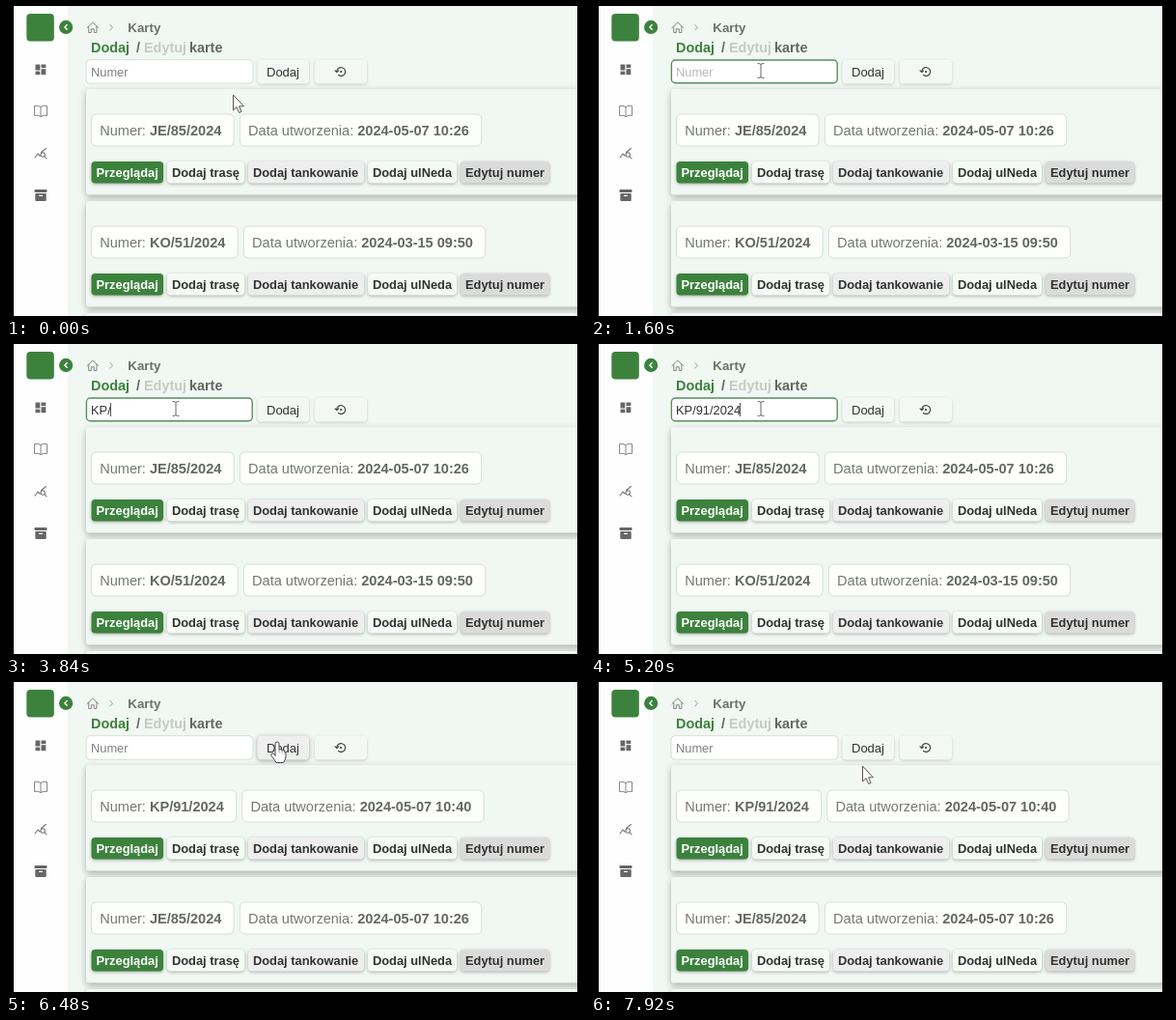
Recreate the animation shown at these times as an HTML page with a canvas. Size 600 by 321 pixels, loop 8000 ms.

```html
<!DOCTYPE html>
<html lang="pl">
<head>
<meta charset="utf-8">
<title>Karty</title>
<style>
html, body { margin: 0; width: 100%; height: 100%; overflow: hidden; background: #000; }
canvas { display: block; }
</style>
</head>
<body>
<canvas id="stage" width="600" height="321"></canvas>
<script>
const ctx = document.getElementById('stage').getContext('2d');
const LOOP = 8000, STEP = 80;
const GREEN = '#3c823d', PAGE = '#f1f7f2', GREY = '#747774', INK = '#303230';
const SMALL = 12.85, MEDIUM = 14.55;
const SANS = '"Liberation Sans", Arial, sans-serif';

const FOCUS = 880, ADDED = 6400;
const ENTRY = 'KP/91/2024';
const KEY_TIMES = [3280, 3520, 3680, 4000, 4320, 4640, 4880, 4960, 5120, 5200];
const CARET_ON = [[880, 1360], [1920, 2320], [2880, 5760], [6320, 6400]];
const CARDS = [
  ['KP/91/2024', '2024-05-07 10:40'],
  ['JE/85/2024', '2024-05-07 10:26'],
  ['KO/51/2024', '2024-03-15 09:50']
];
const ACTIONS = [
  ['Przeglądaj', 88.5, 74.5, GREEN, '#fff'],
  ['Dodaj trasę', 167, 80, '#f5faf5', INK],
  ['Dodaj tankowanie', 251, 120, '#eeeeef', INK],
  ['Dodaj ulNeda', 375, 92, '#f5faf5', INK],
  ['Edytuj numer', 471, 92, '#dadbda', INK]
];
const MOVES = [
  { start: 480, end: 960, from: [235, 92], to: [176, 67] },
  { start: 5600, end: 6080, from: [176, 67], to: [281, 63] },
  { start: 7280, end: 7920, from: [281, 63], to: [281, 87] }
];

const font = (size, bold) => `${bold ? 'bold ' : ''}${size}px ${SANS}`;

function text(str, x, y, size, color, bold = false) {
  ctx.font = font(size, bold);
  ctx.fillStyle = color;
  ctx.fillText(str, x, y);
  return ctx.measureText(str).width;
}

function box(x, y, w, h, r, fill, stroke, line = 1) {
  ctx.beginPath();
  ctx.roundRect(x, y, w, h, r);
  if (fill) { ctx.fillStyle = fill; ctx.fill(); }
  if (stroke) { ctx.strokeStyle = stroke; ctx.lineWidth = line; ctx.stroke(); }
}

function raised(alpha, blur, dy, draw) {
  ctx.save();
  ctx.shadowColor = `rgba(0,0,0,${alpha})`;
  ctx.shadowBlur = blur;
  ctx.shadowOffsetY = dy;
  draw();
  ctx.restore();
}

function path(d, stroke, fill, line = 1.2, x = 0, y = 0) {
  const p = new Path2D(d);
  ctx.save();
  ctx.translate(x, y);
  ctx.lineJoin = ctx.lineCap = 'round';
  ctx.lineWidth = line;
  if (fill) { ctx.fillStyle = fill; ctx.fill(p); }
  if (stroke) { ctx.strokeStyle = stroke; ctx.stroke(p); }
  ctx.restore();
}

function sidebar() {
  box(8, 0, 56, 321, 0, '#fdfefd');
  box(21.3, 8, 28.5, 28.5, 4, GREEN);
  box(55, 14.8, 14.2, 14.2, 7.1, GREEN);
  path('M63.2 19.6L60.9 21.9L63.2 24.2', '#fff', null, 1.4);

  const icon = '#666';
  for (const [x, y, h] of [[30.5, 60.5, 6], [36.5, 60.5, 3.6], [30.5, 67.6, 3.6], [36.5, 65.2, 6]])
    box(x, y, 4.8, h, 0, icon);
  path('M36 104.5Q33 102.5 29.5 103.5V113.5Q33 112.5 36 114.5Q39 112.5 42.5 113.5V103.5Q39 102.5 36 104.5V114.5', '#858585', null, 1);
  path('M30 157L33 153L35 155M36.5 151.5L41.5 147.5M40.4 154A2.2 2.2 0 1 1 36 154A2.2 2.2 0 1 1 40.4 154M39.8 155.6L42 158', '#777', null, 1.1);
  box(29.5, 190, 13, 3, 0.8, icon);
  box(30.3, 194, 11.4, 8, 1, icon);
  box(34, 195.7, 4, 1.4, 0.5, '#fff');
}

function header() {
  path('M84 22.5L89.8 17L95.6 22.5M85.7 21.5V27.5H88.3V23.8H91.3V27.5H93.9V21.5', '#858585', null, 1);
  path('M107.7 19.5L110.5 22.2L107.7 25', '#999', null, 1);
  text('Karty', 126.3, 27, 13.3, '#6c6f6c', true);
  text('Dodaj', 88, 48.4, 14.4, GREEN, true);
  text('/', 135, 48.4, 14.4, '#666', true);
  text('Edytuj', 143, 48.4, 14.4, '#c6cac6', true);
  text('karte', 190, 48.4, 14.4, '#646764', true);
}

function form(t, pos) {
  const focused = t >= FOCUS && t < ADDED;
  const typed = t < ADDED ? ENTRY.slice(0, KEY_TIMES.filter(k => k <= t).length) : '';
  if (focused) box(83.4, 56, 171.8, 23.8, 4, '#fff', '#568f60', 1.4);
  else box(83, 55.7, 173, 24.5, 4, '#fff', '#d8ddd8');

  let end = 88;
  if (typed) end += text(typed, 88, 72.5, SMALL, INK);
  else text('Numer', 88, 72.5, SMALL, focused ? '#b8b8b8' : '#808080');
  if (CARET_ON.some(([a, b]) => t >= a && t < b)) {
    ctx.fillStyle = '#555';
    ctx.fillRect(Math.floor(end - 0.5), 61, 1, 14);
  }

  const hover = pos[0] >= 260 && pos[0] <= 314 && pos[1] < 81;
  raised(hover ? 0.35 : 0.18, hover ? 4 : 3, 1, () =>
    box(260.5, 55.5, 53.5, 25, 4, hover ? '#eeefee' : '#f4f8f4'));
  text('Dodaj', 270, 72.5, 13, INK);
  raised(0.18, 3, 1, () => box(320, 55.5, 54, 25, 4, '#f4f8f4'));
  path('M342.8 68A4.4 4.4 0 1 1 344.5 71.5M341 66.8L342.8 68.6L344.6 66.8', '#444', null, 1.2);
  box(346, 67, 2.2, 2.2, 1.1, '#444');
}

function chip(x, y, label, value) {
  ctx.font = font(MEDIUM);
  const labelWidth = ctx.measureText(label + ' ').width;
  ctx.font = font(MEDIUM, true);
  const width = labelWidth + ctx.measureText(value).width + 21.5;
  box(x, y, width, 33, 5, '#fdfffd', '#d8ddd8');
  text(label, x + 8.7, y + 22, MEDIUM, GREY);
  text(value, x + 8.7 + labelWidth, y + 22, MEDIUM, '#646764', true);
  return x + width;
}

function card(y, [number, date]) {
  raised(0.3, 7, 2.5, () => box(83, y, 530, 109.5, 3, PAGE));
  const next = chip(88.5, y + 26, 'Numer:', number) + 6.2;
  chip(next, y + 26, 'Data utworzenia:', date);
  for (const [label, x, w, fill, ink] of ACTIONS) {
    raised(0.3, 3.5, 1, () => box(x, y + 75, w, 22.5, 4, fill));
    text(label, x + 5, y + 91, SMALL, ink, true);
  }
}

function pointerAt(t) {
  let pos = MOVES[0].from;
  for (const { start, end, from, to } of MOVES) {
    if (t < start) break;
    const p = Math.min(1, (t - start) / (end - start));
    const e = p * p * (3 - 2 * p);
    pos = from.map((v, i) => v + (to[i] - v) * e);
  }
  return pos;
}

function pointer([x, y]) {
  const inRow = y > 56 && y < 81;
  if (inRow && x > 83 && x < 256) {
    path('M-3 -7.5Q-.5 -7.5 0 -6.5Q.5 -7.5 3 -7.5M0 -6.5V6.5M-3 7.5Q-.5 7.5 0 6.5Q.5 7.5 3 7.5', '#666', null, 1, x, y);
  } else if (inRow && x >= 260 && x <= 314) {
    path('M-2 11V1Q-2 -1 0 -1Q2 -1 2 1V7Q4.6 5.8 5 8Q7.4 7 7.8 9Q9 8.6 9 11V14Q9 17 6.5 20.5H-1Q-2.5 17.5 -6 13.5Q-7 11.5 -5 10.8Q-3.5 10.6 -2 13Z', '#444', '#fff', 1, x, y);
    path('M2 7V10M5 8V10.5M7.6 9V11', '#777', null, 0.7, x, y);
  } else {
    path('M.5 .5V16L4 12.6L6.6 18.5L9 17.4L6.5 11.8H11Z', '#555', '#fff', 1, x, y);
  }
}

function draw(t) {
  const pos = pointerAt(t);
  box(0, 0, 600, 321, 0, PAGE);
  sidebar();
  header();
  form(t, pos);
  const first = t < ADDED ? 1 : 0;
  card(86, CARDS[first]);
  card(202, CARDS[first + 1]);
  raised(0.3, 7, 2.5, () => box(83, 318, 530, 109.5, 3, PAGE));
  box(0, 0, 8, 321, 0, '#000');
  box(592, 0, 8, 321, 0, '#000');
  pointer(pos);
}

const origin = performance.now();
function tick() {
  const t = (performance.now() - origin) % LOOP;
  draw(Math.floor(t / STEP) * STEP);
  requestAnimationFrame(tick);
}
tick();
</script>
</body>
</html>
```
